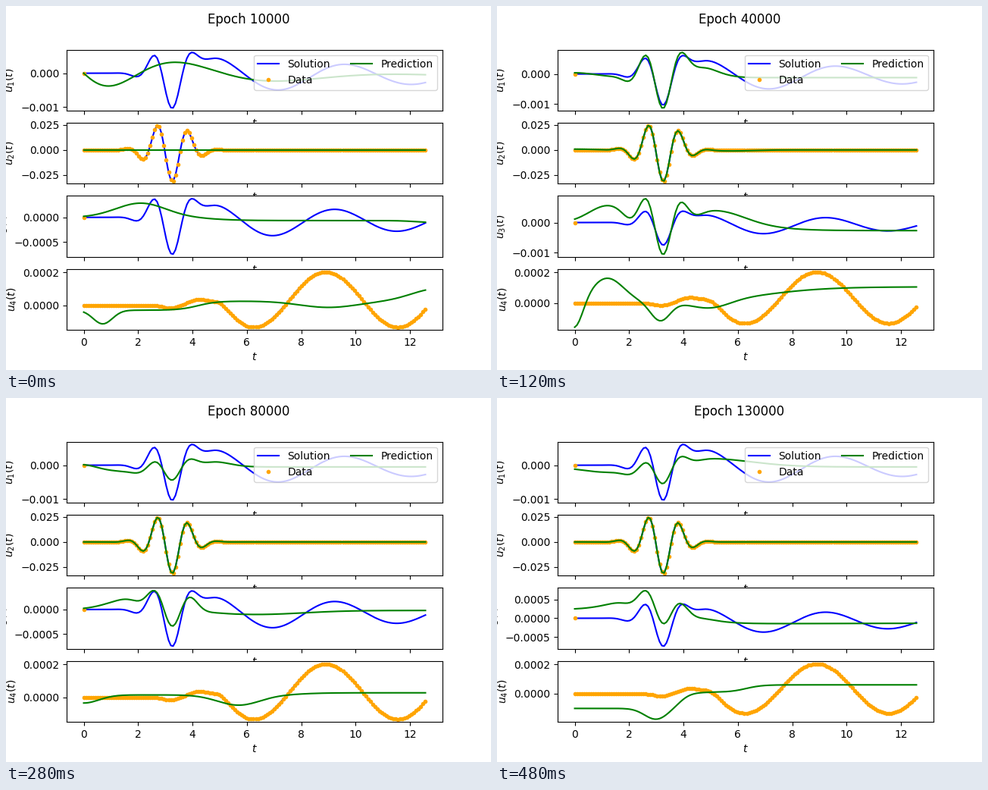
Animation, 640 px wide and 480 px high, one loop 0.52 s. Source, as a matplotlib script:

```python
import numpy as np
import matplotlib.pyplot as plt
from matplotlib.animation import FuncAnimation

FRAMES, INTERVAL = 13, 40
T = np.linspace(0, 4 * np.pi, 150)
UNIT = 1e-4  # curves below are written in this unit


def bump(height, center, width):
    return height * np.exp(-((T - center) / width) ** 2)


def rise(height, center, width):
    return height / (1 + np.exp(-(T - center) / width))


def packet(depth, center, omega, narrow, skew):
    """Short wave burst under a slightly lopsided Gaussian envelope."""
    x = T - center
    return -depth * np.cos(omega * x) * np.exp(-narrow * x ** 2 - skew * x)


def ring(mean, amp, peak, period, decay, onset):
    """Damped oscillation that fades in around the onset."""
    x = T - peak
    wave = mean + amp * np.exp(-decay * x) * np.cos(2 * np.pi * x / period)
    return wave * rise(1, onset, 0.2)


# Solution of the four components
burst = packet(8.7, 3.27, 4.22, 1.3, 0.28)
u1 = burst + ring(-0.7, 5.4, 4.75, 4.9, 0.1, 3.2)
u2 = packet(316, 3.265, 5.445, 1.2, 0.23)
u3 = 0.71 * burst + ring(-0.8, 3.5, 4.7, 4.57, 0.08, 3.2)
u4 = ring(0.35, 1.68, 8.9, 5.3, 0, 5) + bump(0.32, 4.2, 0.5) + bump(-0.16, 3.2, 0.4)
SOLUTION = [u1, u2, u3, u4]

# Predictions of the four components after 10000 * key epochs
chirp = np.sin(np.pi * np.log(1 + T / 3.82) / 0.43)
STAGES = {
    1: [bump(-3.8, 0, 9) * chirp - 0.006 * T ** 2,
        0 * T,
        bump(2.9, 2.1, 1.3) - rise(0.65, 4.7, 0.6) + bump(-0.4, 13, 1),
        -0.3 + bump(-0.83, 0.7, 0.5) + rise(0.55, 4.2, 0.35)
        + bump(-0.38, 9, 1.5) + bump(0.75, 13, 1.3)],
    3: [bump(-7, 0.8, 0.6) + bump(29.3, 2.65, 0.38) + bump(18, 3.87, 0.3)
        + bump(-6, 5.6, 3.4),
        u2 + bump(-30, 0.9, 0.5) + bump(15, 2, 0.7) + bump(-60, 4.4, 0.5)
        + bump(46, 6, 1.8) - rise(24, 10, 1),
        bump(14, 0.7, 0.48) + bump(-15.5, 2.03, 0.38) + bump(5, 2.67, 0.25)
        + bump(-13.5, 3.27, 0.3) + bump(10.5, 3.88, 0.27)
        + bump(-5.4, 4.8, 0.6) - 0.15 * T,
        bump(9, 0, 1.15) + bump(-9.25, 2.1, 0.55) + bump(7.9, 3.75, 0.55)
        + rise(0.8, 4.5, 0.3) - 0.13 * T],
    4: [1.3 * burst - 1.2 + bump(1.6, 0, 1.1) + bump(4.2, 4.4, 1),
        u2 + bump(8, 0, 1) + bump(-10, 5.8, 1),
        1.3 * burst + bump(5.6, 1.2, 0.95) + bump(4.2, 5.2, 1.4)
        - rise(2.7, 7, 0.8),
        bump(-1.8, 0, 0.42) + bump(1.6, 1.2, 0.85) + bump(-1.2, 3.15, 0.5)
        + bump(-0.5, 5, 1) + rise(1.05, 6.9, 1.2)],
    6: [0.52 * burst - 0.6 + bump(0.5, 0, 1) + bump(2.1, 4.9, 1.2),
        u2,
        0.52 * burst + bump(1.1, 1.9, 0.8) + bump(2.7, 4.6, 1.4)
        - rise(1.1, 6, 0.6),
        -0.65 + rise(0.92, 0.6, 0.25) + bump(-1.4, 5.6, 1.15)
        + bump(-0.7, 7.3, 1.1) + rise(0.35, 9, 0.8)],
    8: [0.42 * burst - 0.5 + bump(0.9, 0, 0.6) + bump(-1.4, 1.7, 1.3)
        + bump(1.6, 4.7, 0.9),
        u2,
        0.45 * burst + bump(2.3, 1.8, 1.2) + bump(1.1, 4, 0.6)
        + bump(-0.95, 6.2, 2.5) - rise(0.2, 7, 1),
        0.14 + bump(-0.49, 0, 0.8) + bump(-0.62, 5.7, 1.1) + rise(0.13, 8, 0.5)],
    11: [0.45 * burst - 0.35 - 0.07 * T + bump(1.6, 0, 1.1) + bump(2.2, 4.4, 1.4),
         u2,
         0.52 * burst + 2.1 + 0.05 * T + bump(2.2, 2.2, 1.3)
         - rise(3.95, 4.4, 0.6),
         -1.5 + bump(-0.35, 2.8, 0.8) + rise(2.35, 4.25, 0.28)
         + rise(0.5, 6.4, 0.35)],
    13: [0.5 * burst - 0.5 + bump(-1.4, 1, 1.2) + bump(-2.6, 2.8, 1.3)
         + bump(2.6, 4.7, 2.4),
         u2,
         0.54 * burst + 2.4 + 0.02 * T + bump(2.3, 2.2, 1.3)
         - rise(4, 4.5, 0.55),
         -1 + bump(-0.75, 3, 0.6) + rise(1.1, 3.9, 0.22) + rise(0.5, 6.3, 0.3)],
}


def predict(step):
    """Predictions at a training step, blended between the nearest stages."""
    lo = max(s for s in STAGES if s <= step)
    hi = min(s for s in STAGES if s >= step)
    w = (step - lo) / max(hi - lo, 1)
    return (1 - w) * np.array(STAGES[lo]) + w * np.array(STAGES[hi])


fig, axes = plt.subplots(4, 1, sharex=True, figsize=(6.4, 4.8), dpi=100)
title = fig.suptitle("", y=0.982)
lines = []
for i, (ax, u) in enumerate(zip(axes, SOLUTION)):
    seen = slice(None) if i % 2 else slice(1)
    ax.plot(T, u * UNIT, color="blue", label="Solution")
    ax.plot(T[seen], u[seen] * UNIT, ".", color="orange", label="Data")
    lines += ax.plot(T, 0 * T, color="green", label="Prediction")
    ax.set_xlabel("$t$")
    ax.set_ylabel(f"$u_{i + 1}(t)$")
axes[0].legend(loc="upper right", ncol=2)


def draw(frame):
    step = frame + 1
    title.set_text(f"Epoch {step * 10000}")
    for ax, line, u in zip(axes, lines, predict(step)):
        line.set_ydata(u * UNIT)
        ax.relim()
        ax.autoscale_view()
    return [title, *lines]


anim = FuncAnimation(fig, draw, frames=FRAMES, interval=INTERVAL,
                     repeat=True, repeat_delay=0, blit=False)
plt.show()
```
